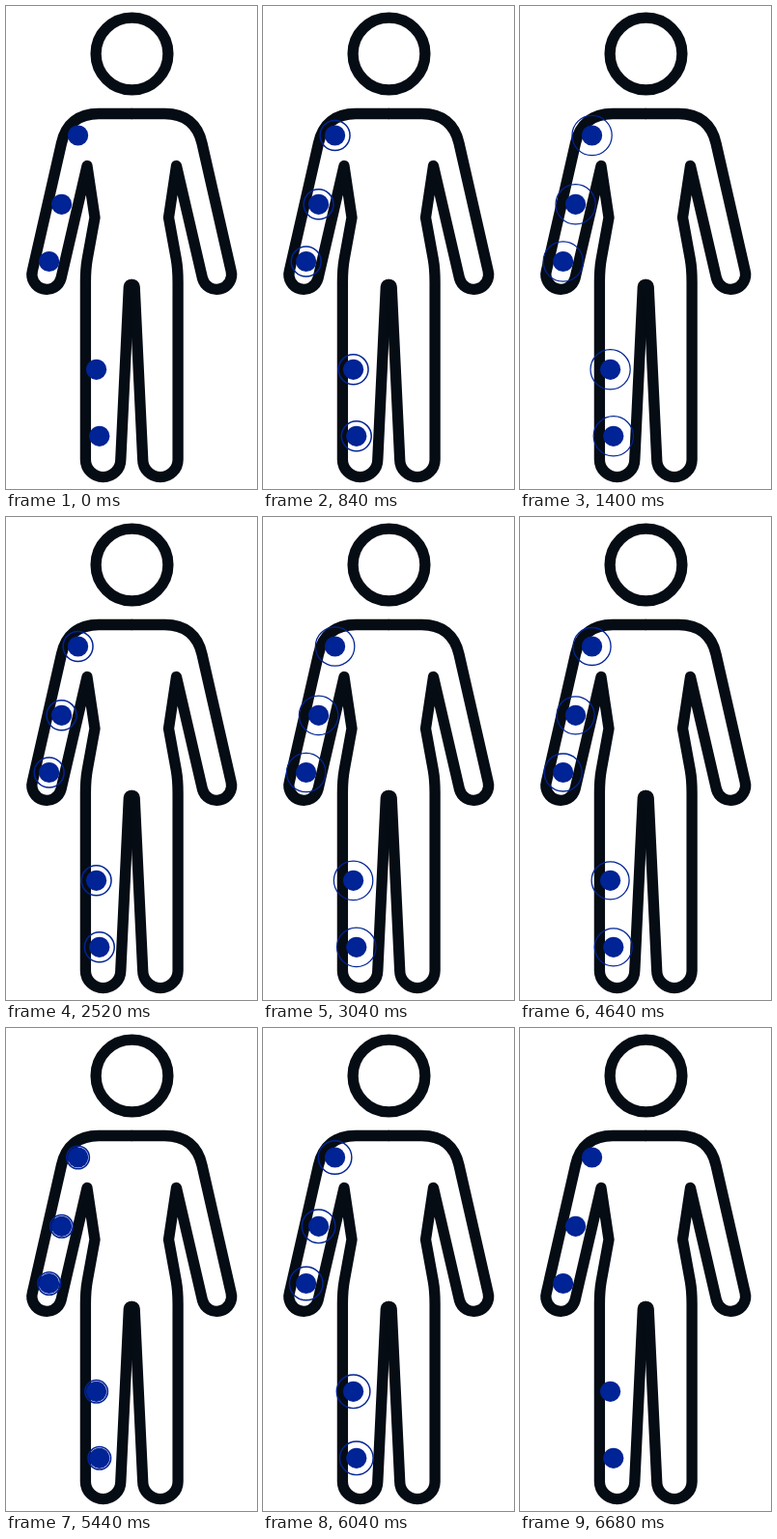
Recreate the animation shown at these times as an HTML page. Size 260 px wide and 500 px high, loop 7000 ms.

```html
<!DOCTYPE html>
<html lang="en">
<head>
<meta charset="utf-8">
<title>Body sensors</title>
<style>
  html, body { margin: 0; width: 100%; height: 100%; overflow: hidden; background: #fff; }
  svg { display: block; width: 260px; height: 500px; }
  .body { fill: none; stroke: #060c14; stroke-width: 11.3; stroke-linecap: round; stroke-linejoin: round; }
  .dot { fill: #002395; }
  .ring { fill: none; stroke: #002395; }
</style>
</head>
<body>
<svg viewBox="0 0 260 500">
  <g class="body">
    <circle cx="130.5" cy="49.5" r="37.4"/>
    <path id="half" d="M130.25 111.5 H96 C75 111.5 62 122 57.5 142
      L27.4 274 A15.3 15.3 0 0 0 57 282 L84 165.5 L92 219
      L84.2 262 Q82.4 272 82.4 286 V469.5 A18.2 18.2 0 0 0 118.8 469.5
      L127.3 291 Q127.8 288.5 130.25 288.5"/>
    <use href="#half" transform="translate(260.5) scale(-1 1)"/>
  </g>
  <g id="sensors"></g>
</svg>
<script>
  const LOOP = 7000, STEP = 40, PULSE = 1400;
  const pulseStarts = [280, 1960, 3640, 5280];
  const spots = [[74.6, 134], [57.6, 205.3], [44.7, 264.5], [93.6, 376.3], [96.8, 445.3]];
  const sensors = document.getElementById('sensors');

  function addCircle(name, [x, y], r) {
    const circle = document.createElementNS('http://www.w3.org/2000/svg', 'circle');
    const attrs = { class: name, cx: x, cy: y, r };
    for (const key in attrs) circle.setAttribute(key, attrs[key]);
    return sensors.appendChild(circle);
  }

  const rings = spots.map(spot => addCircle('ring', spot, 10));
  spots.forEach(spot => addCircle('dot', spot, 10.6));

  function draw(time) {
    const now = Math.floor((time % LOOP) / STEP) * STEP;
    const start = pulseStarts.find(s => now >= s && now < s + PULSE);
    const active = start !== undefined;
    const age = active ? now - start : 0;
    const radius = 10.3 + age * 0.0092;
    const width = 1.6 - 0.6 * (age / PULSE) ** 2;
    for (const ring of rings) {
      ring.setAttribute('visibility', active ? 'visible' : 'hidden');
      ring.setAttribute('r', radius);
      ring.setAttribute('stroke-width', width);
    }
  }

  const origin = performance.now();
  function tick() {
    draw(performance.now() - origin);
    requestAnimationFrame(tick);
  }
  tick();
</script>
</body>
</html>
```
